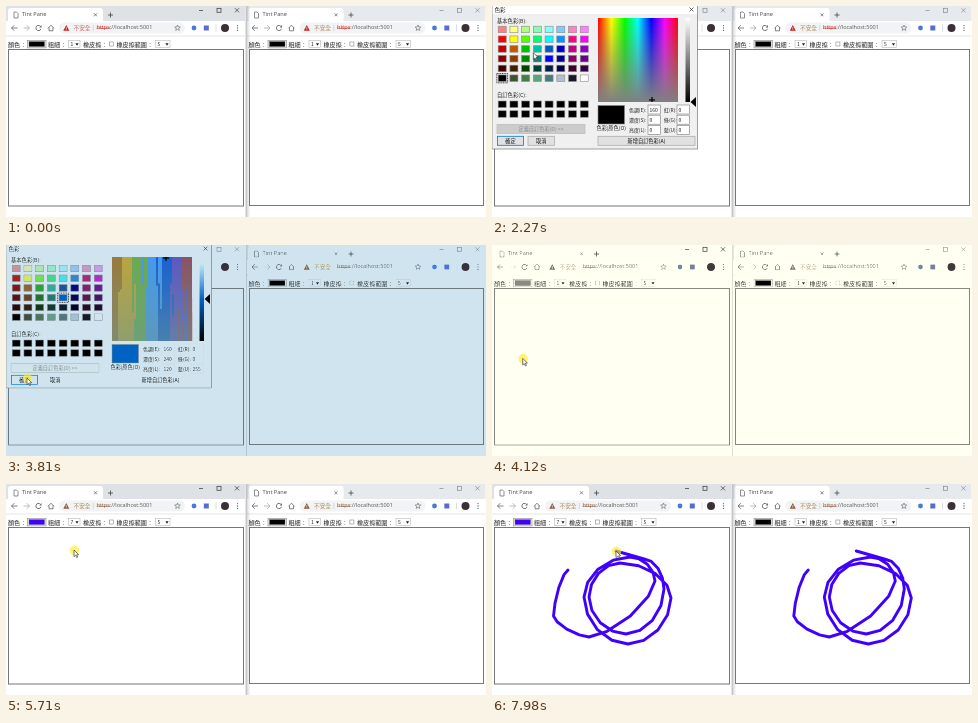
Write an HTML page with a canvas that moves like this. It is 480 px wide and 211 px high and loops after 8000 ms.

```html
<!DOCTYPE html>
<html lang="zh-Hant">
<head>
<meta charset="utf-8">
<title>Tint Pane</title>
<style>
html, body { margin: 0; width: 100%; height: 100%; overflow: hidden; background: #fff; }
canvas { display: block; width: 480px; height: 211px; }
</style>
</head>
<body>
<canvas id="stage"></canvas>
<script>
const W = 480, H = 211, LOOP = 8000;
const cv = document.getElementById('stage');
const dpr = window.devicePixelRatio || 1;
cv.width = W * dpr;
cv.height = H * dpr;
const c = cv.getContext('2d');
const SANS = '"Noto Sans CJK TC", "Noto Sans CJK", "Noto Sans", sans-serif';
const UI = '"Open Sans", "Noto Sans", sans-serif';
const INK = '#4000ff';

// key times in ms
const OPEN = 1920, PICK = 2690, CLOSE = 3890, WIDTH = 5710, DRAW = 6250, CORNER = 6630, END = 7980;

const clamp = v => Math.max(0, Math.min(1, v));
const mix = (a, b, k) => a + (b - a) * k;
const smooth = k => k * k * (3 - 2 * k);
const noise = n => { const s = Math.sin(n * 12.9898) * 43758.5453; return s - Math.floor(s); };

// the scribble's extremes in turn: top, left, bottom, right; joined by quarter ellipses
const turns = [
  [76, 86], [61.5, 132], [97, 153], [163, 97],
  [138, 73], [92, 113], [136, 160], [179, 114],
  [128, 79], [97, 113], [134, 150], [172, 105], [152, 75]
];
const stroke = [turns[0]];
for (let i = 1; i < turns.length; i++) {
  const a = turns[i - 1], b = turns[i], flat = i < 4 ? 1.35 : 1.05;
  for (let s = 1; s <= 4; s++) {
    const q = s / 4 * Math.PI / 2;
    const go = Math.sin(q) ** flat, stay = 1 - Math.max(0, Math.cos(q)) ** flat;
    stroke.push(i % 2 ? [mix(a[0], b[0], go), mix(a[1], b[1], stay)]
                      : [mix(a[0], b[0], stay), mix(a[1], b[1], go)]);
  }
}
stroke.push([124, 67]);
const dist = [0];
for (let i = 1; i < stroke.length; i++) {
  dist[i] = dist[i - 1] + Math.hypot(stroke[i][0] - stroke[i - 1][0], stroke[i][1] - stroke[i - 1][1]);
}
const total = dist[dist.length - 1], cornerDist = dist[8];

// pointer moves: start, end, x, y
const moves = [
  [1050, 1790, 32, 38], [1920, 2550, 48, 53], [3020, 3380, 61, 129], [3380, 3780, 21, 133],
  [CLOSE, 4680, 68, 38], [4980, 5430, 68, 66], [WIDTH, DRAW, 76, 86]
];

function box(x, y, w, h, fill, line, lw = 0.6) {
  if (fill) { c.fillStyle = fill; c.fillRect(x, y, w, h); }
  if (line) { c.strokeStyle = line; c.lineWidth = lw; c.strokeRect(x, y, w, h); }
}
function text(s, x, y, size, color = '#222', font = SANS, align = 'left') {
  c.font = size + 'px ' + font;
  c.textAlign = align;
  c.textBaseline = 'middle';
  c.fillStyle = color;
  c.fillText(s, x, y);
}
function line(pts, color, lw = 0.8) {
  c.beginPath();
  pts.forEach(p => c.lineTo(p[0], p[1]));
  c.strokeStyle = color;
  c.lineWidth = lw;
  c.stroke();
}
function poly(pts, fill) {
  c.beginPath();
  pts.forEach(p => c.lineTo(p[0], p[1]));
  c.fillStyle = fill;
  c.fill();
}
function disc(x, y, r, fill) {
  c.beginPath();
  c.arc(x, y, r, 0, Math.PI * 2);
  c.fillStyle = fill;
  c.fill();
}
function round(x, y, w, h, r, fill) {
  c.beginPath();
  c.roundRect(x, y, w, h, r);
  c.fillStyle = fill;
  c.fill();
}
function cross(x, y, r, color, lw = 0.7) {
  line([[x - r, y - r], [x + r, y + r]], color, lw);
  line([[x - r, y + r], [x + r, y - r]], color, lw);
}
function ramp(x0, y0, x1, y1, colors) {
  const g = c.createLinearGradient(x0, y0, x1, y1);
  colors.forEach((s, i) => g.addColorStop(i / (colors.length - 1), s));
  return g;
}

function headAt(t) {
  if (t < CORNER) return cornerDist * smooth(clamp((t - DRAW) / (CORNER - DRAW)));
  return mix(cornerDist, total, clamp((t - CORNER) / (END - CORNER)));
}
function strokeTo(d) {
  const n = dist.findIndex(v => v >= d);
  if (n < 1) return [stroke[0]];
  const a = stroke[n - 1], b = stroke[n], k = (d - dist[n - 1]) / (dist[n] - dist[n - 1]);
  return stroke.slice(0, n).concat([[mix(a[0], b[0], k), mix(a[1], b[1], k)]]);
}
function pointerAt(t) {
  if (t >= DRAW) return strokeTo(headAt(t)).pop();
  let p = [120, 216];
  for (const [t0, t1, x, y] of moves) {
    const k = smooth(clamp((t - t0) / (t1 - t0)));
    p = [mix(p[0], x, k), mix(p[1], y, k)];
  }
  return p;
}
function modeAt(t) {
  if (t < 3020 || t >= WIDTH) return 'full';
  if (t < 3740) return 'grey';
  return t < 4000 ? 'blue' : 'pale';
}

function select(x, w, value) {
  box(x, 34.5, w, 7, '#fff', '#aaa', 0.5);
  text(value, x + 2, 38.3, 5);
  poly([[x + w - 4.6, 37.2], [x + w - 1.4, 37.2], [x + w - 3, 39.8]], '#222');
}
function arrow(x, dir, color) {
  line([[x - 3, 22], [x + 3, 22]], color);
  line([[x + dir * 0.2, 19.2], [x + dir * 3, 22], [x + dir * 0.2, 24.8]], color);
}

function tabStrip(active) {
  const grey = '#5f6368', dark = active ? '#333' : '#888';
  box(0, 0, 239, 15, active ? '#dee1e6' : '#e7eaed');
  round(2, 2, 95, 14, [3, 3, 0, 0], '#fff');
  line([[8, 6], [10.5, 6], [12, 7.5], [12, 12], [8, 12], [8, 6]], grey, 0.7);
  text('Tint Pane', 16, 9, 5.6, '#444', UI);
  cross(89.5, 8.8, 1.5, '#555');
  line([[102, 9], [107, 9]], '#444');
  line([[104.5, 6.5], [104.5, 11.5]], '#444');
  line([[193, 4.5], [197, 4.5]], dark, 0.7);
  box(211, 2.3, 4, 4, null, dark, 0.7);
  cross(231, 4.3, 2.1, dark);
}

function toolbar(warn, note) {
  const grey = '#5f6368';
  box(0, 15, 239, 15, '#fff');
  line([[0, 30], [239, 30]], '#dadce0', 0.7);
  arrow(8.5, -1, grey);
  arrow(20.5, 1, '#aaa');
  c.beginPath();
  c.arc(32.5, 22, 2.6, 0.3, 5.4);
  c.strokeStyle = grey;
  c.lineWidth = 0.9;
  c.stroke();
  poly([[33.2, 21.4], [35.5, 21.4], [35.5, 19]], grey);
  line([[42, 22.3], [45, 19.2], [48, 22.3]], grey);
  line([[43, 21.5], [43, 24.8], [47, 24.8], [47, 21.5]], grey);

  round(53, 16.5, 126, 11, 5.5, '#f1f3f4');
  poly([[60.3, 19], [63.3, 24.7], [57.3, 24.7]], warn);
  line([[60.3, 21], [60.3, 23.8]], '#fff', 0.6);
  text('不安全', 67.5, 21.9, 5.7, note);
  line([[87.3, 19], [87.3, 25]], '#c4c7cb', 0.6);
  text('https', 90.5, 21.9, 5.5, warn, UI);
  const end = 90.5 + c.measureText('https').width;
  line([[90.5, 22.3], [end, 22.3]], warn, 0.6);
  text('://localhost:5001', end, 21.9, 5.5, '#555', UI);

  const star = [];
  for (let i = 0; i <= 10; i++) {
    const a = i * Math.PI / 5 - Math.PI / 2, r = i % 2 ? 1.3 : 3;
    star.push([171.5 + r * Math.cos(a), 22 + r * Math.sin(a)]);
  }
  line(star, grey, 0.6);
  disc(188, 22, 2.4, '#4a78d8');
  box(197.8, 19.5, 5, 5, '#5a6cd0');
  line([[210, 18.5], [210, 25.5]], '#c4c7cb', 0.6);
  disc(219, 22, 4, '#3b3038');
  for (let i = -1; i < 2; i++) disc(231.5, 22 + i * 2.4, 0.65, grey);
}

function browser(x, color, width, t, active) {
  const early = t < 3020;
  c.save();
  c.translate(x, 0);
  tabStrip(active);
  toolbar(early ? '#c5221f' : '#8a5a3c', active && early ? '#cc6660' : '#ad8a55');
  text('顏色：', 2, 38.3, 6.1);
  box(21.5, 34.3, 18.5, 7.6, '#efefef', '#888');
  box(23, 35.6, 15.5, 5, color, '#666', 0.4);
  text('粗細：', 42, 38.3, 6.1);
  select(62.5, 11.5, width);
  text('橡皮擦：', 77, 38.3, 6.1);
  box(103.4, 36, 4, 4, '#fff', '#888');
  text('橡皮擦範圍：', 110.5, 38.3, 6.1);
  select(149.5, 14.5, '5');
  c.restore();
}

function ink(x, t) {
  if (t < DRAW) return;
  c.save();
  c.translate(x, 0);
  c.lineCap = c.lineJoin = 'round';
  line(strokeTo(headAt(t)), INK, 2.9);
  c.restore();
}

function hueField(mode) {
  const x = 106, y = 12, w = 80, h = 84, n = 40;
  if (mode === 'full') {
    box(x, y, w, h, ramp(x, 0, x + w, 0, ['#f00', '#ff0', '#0f0', '#0ff', '#00f', '#f0f', '#f00']));
    box(x, y, w, h, ramp(0, y, 0, y + h, ['rgba(128,128,128,0)', '#808080']));
    return;
  }
  const tones = ['#a8783a', '#c9a33c', '#74a84e', '#4a98e0', '#1c60c4', '#6458b8', '#96525e'];
  for (let i = 0; i < n; i++) {
    const u = i / n, left = x + i * w / n;
    if (mode === 'grey') {
      const crest = Math.cos((u - 0.14) / 0.35 * Math.PI * 2) + 0.3;
      box(left, y, 2.1, h, '#5c5a64');
      if (crest > 0) box(left, y, 2.1, 36 + crest * 24 + noise(i) * 6, '#a9a9ad');
    } else {
      for (let s = 0; s < 3; s++) {
        const top = s * 26 + (s ? noise(i + s * 50) * 16 : 0);
        const k = Math.floor(u * 6.4 + noise(i * 3 + s) * 0.9);
        box(left, y + top, 2.1, h - top, tones[Math.min(6, k)]);
      }
    }
  }
  if (mode === 'blue') box(x, y, w, h, ramp(0, y, 0, y + h, ['rgba(120,150,140,0)', 'rgba(120,150,140,.55)']));
}

// vivid rows on top, darker earthy rows below, greys last
function swatch(col, row) {
  if (row === 5) return `hsl(${60 + col * 30},${col % 7 ? 28 : 0}%,${[0, 25, 38, 50, 38, 75, 13, 100][col]}%)`;
  const hue = row < 2 ? [0, 60, 100, 145, 180, 205, 328, 300][col] : [0, 27, 120, 170, 212, 240, 318, 285][col];
  return `hsl(${hue},100%,${[75, 50, 38, 27, 13][row]}%)`;
}
function swatches(picked, tone, mode) {
  for (let i = 0; i < 64; i++) {
    const col = i % 8, row = Math.floor(i / 8), custom = row > 5;
    const x = 6.2 + col * 11.72, y = 20.2 + row * 9.75 + (custom ? 16.3 : 0);
    const fill = custom ? '#000' : i === 28 ? (picked ? tone : '#00f') : swatch(col, row);
    box(x, y, 8, 6.5, fill, '#8a8a8a');
    if (mode === 'blue' && i !== 28) blend('saturation', 'rgba(128,128,128,.45)', x, y, 8, 6.5);
    if (i === (picked ? 28 : 40)) {
      c.setLineDash([1, 0.7]);
      box(x - 1.4, y - 1.4, 10.8, 9.3, null, '#000', 0.8);
      c.setLineDash([]);
    }
  }
}

function button(x, y, w, label, fill, edge, color = '#111') {
  box(x, y, w, 9, fill, edge, 0.8);
  text(label, x + w / 2, y + 4.7, 5.2, color, SANS, 'center');
}

function dialog(t, mode) {
  const picked = t >= PICK;
  const tone = !picked ? '#000' : { full: '#00f', grey: '#484655', blue: '#0062b8' }[mode];
  const face = mode === 'blue' ? '#f0f0f0' : '#e1e1e1';
  box(0, 0, 205.5, 143, '#f0f0f0');
  box(0, 0, 205.5, 8, '#fff');
  box(0, -1, 205.5, 144, null, '#777', 0.7);
  text('色彩', 2.5, 3.8, 5.6);
  cross(199.5, 3.5, 2, '#333');

  text('基本色彩(B):', 5, 15.3, 5.3);
  text('自訂色彩(C):', 5, 89, 5.3);
  swatches(picked, tone, mode);
  button(5, 118.5, 88, '定義自訂色彩(D) >>', mode === 'blue' ? '#e4e4e0' : '#ccc', '#bfbfbf', '#8b8b8b');
  button(5.5, 130.3, 26, '確定', face, '#0078d7');
  button(36, 130.3, 26.5, '取消', face, mode === 'blue' ? face : '#adadad');
  button(106, 130.3, 97, '新增自訂色彩(A)', face, mode === 'blue' ? face : '#adadad');

  hueField(mode);
  const my = picked ? 13 : 94;
  line([[157, my], [163, my]], '#000', 1.2);
  line([[160, Math.max(12, my - 3)], [160, Math.min(96, my + 3)]], '#000', 1.2);
  box(193.5, 12, 4.5, 84, ramp(0, 12, 0, 96, ['#fff', picked ? tone : '#808080', '#000']));
  const ay = picked ? 54 : 96;
  poly([[198.5, ay], [204, ay - 5], [204, ay + 5]], '#000');

  box(106, 99.5, 26.5, 18.5, tone, '#888');
  text('色彩|原色(O)', 104.5, 122.3, 5.2);
  const vals = picked ? [160, 240, 120, 0, 0, 255] : [160, 0, 0, 0, 0, 0];
  ['色調(E):', '濃度(S):', '亮度(L):', '紅(R):', '綠(G):', '藍(U):'].forEach((s, i) => {
    const right = i > 2, y = 99 + i % 3 * 10.2;
    text(s, right ? 172 : 137, y + 4.7, 4.9);
    box(right ? 185 : 156, y, 12.5, 9, '#fff', mode === 'blue' ? '#ccc' : '#7a7a7a');
    text(vals[i], right ? 186.5 : 157.5, y + 4.8, 5);
  });
}

function blend(op, color, x = 0, y = 0, w = W, h = H) {
  c.globalCompositeOperation = op;
  box(x, y, w, h, color);
  c.globalCompositeOperation = 'source-over';
}

function tint(mode) {
  if (mode === 'full') return;
  if (mode === 'grey') return blend('saturation', '#808080');
  if (mode === 'pale') blend('saturation', 'rgba(128,128,128,.7)');
  blend('color-dodge', '#1e1e1e');
  blend('multiply', mode === 'blue' ? '#cfe4ee' : '#fffff2');
}

function pointer(t) {
  const [x, y] = pointerAt(t);
  if (t >= 3600) disc(x + 0.5, y + 0.5, 4.8, 'rgba(255,236,40,.65)');
  const shape = [[0, 0], [0, 6.6], [1.6, 5.2], [2.7, 7.6], [3.7, 7.1], [2.7, 4.8], [4.7, 4.7], [0, 0]]
    .map(q => [x + q[0], y + q[1]]);
  poly(shape, '#fff');
  line(shape, '#222', 0.6);
}

function draw(t) {
  const mode = modeAt(t), open = t >= OPEN && t < CLOSE;
  c.setTransform(dpr, 0, 0, dpr, 0, 0);
  box(0, 0, W, H, '#fff');
  const color = t < CLOSE ? '#000' : mode === 'pale' ? '#7c7b70' : INK;
  browser(0, color, t < WIDTH ? '1' : '7', t, !open);
  browser(240.5, '#000', '1', t, false);
  box(239.5, 0, 5, H, ramp(239.5, 0, 244.5, 0, ['rgba(0,0,0,.2)', 'rgba(0,0,0,0)']));
  box(240, 0, 1, H, '#c4c4c8');
  box(2.5, 43.5, 235, 156.5, null, '#777', 1);
  box(243.5, 43.5, 234, 156, null, '#777', 1);
  ink(0, t);
  ink(240.3, t);
  if (open) dialog(t, mode);
  tint(mode);
  pointer(t);
}

const start = performance.now();
function tick() {
  draw((performance.now() - start) % LOOP);
  requestAnimationFrame(tick);
}
tick();
</script>
</body>
</html>
```
